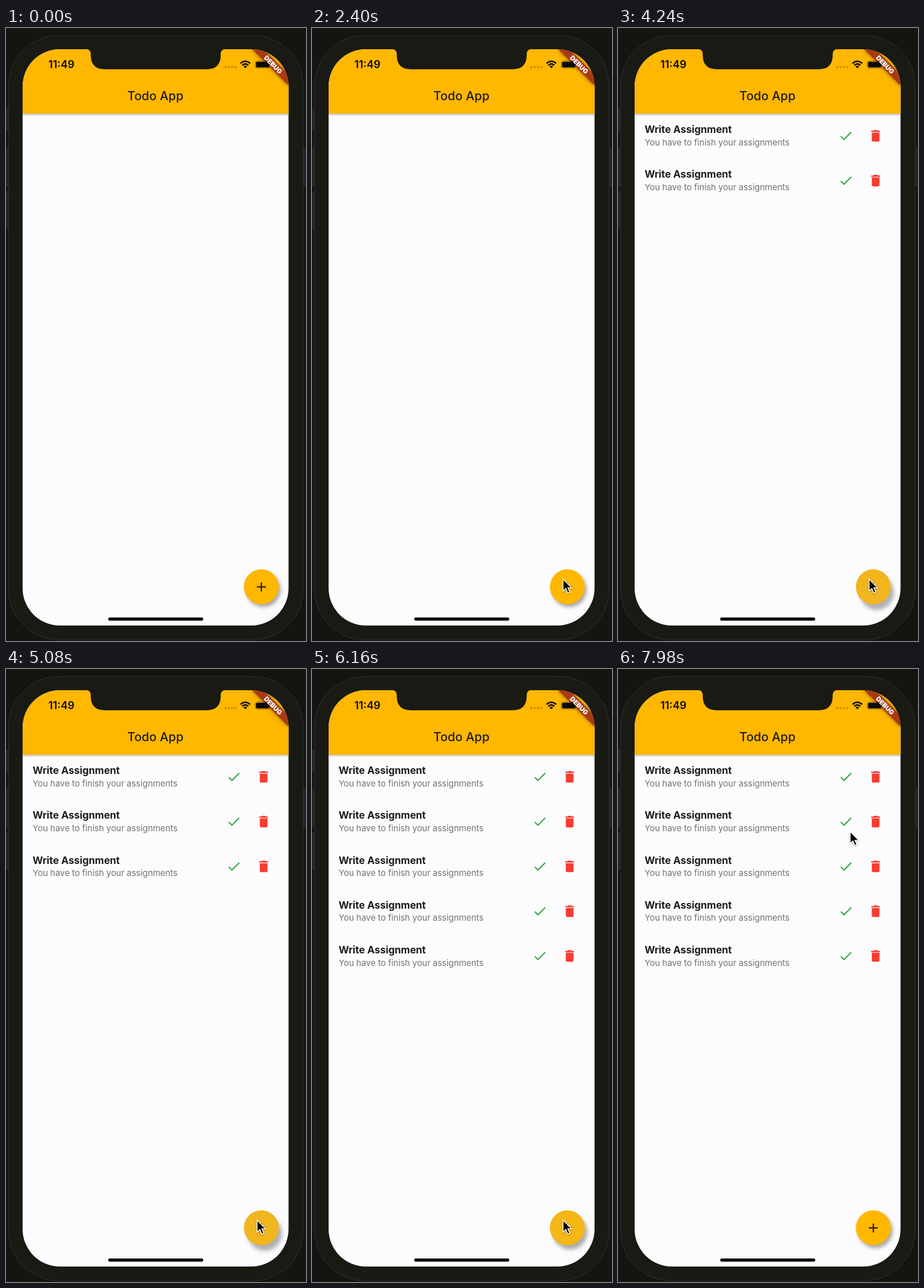
Write an HTML page that moves like this. It is 524 by 1069 pixels and loops after 8 s.

```html
<!DOCTYPE html>
<html lang="en">
<head>
<meta charset="utf-8">
<title>Todo App</title>
<style>
  html, body { margin: 0; width: 100%; height: 100%; overflow: hidden; background: #141511; }
  svg { display: block; width: 100%; height: 100%; }
  text { font-family: Inter, "Liberation Sans", sans-serif; fill: #1d1c1a; }
  .clock { font-size: 18.4px; font-weight: 600; fill: #0b0a05; }
  .bar { font-size: 21.1px; font-weight: 500; letter-spacing: .1px; }
  .head { font-size: 17.4px; font-weight: 700; }
  .sub { font-size: 15px; letter-spacing: -.06px; fill: #747375; }
  .debug { font-size: 11.4px; font-weight: 900; fill: #fff; }
</style>
</head>
<body>
<svg viewBox="0 0 524 1069">
  <defs>
    <clipPath id="screen"><rect x="29" y="37" width="464.5" height="1005" rx="65"/></clipPath>
    <clipPath id="disc"><circle cx="446" cy="974.5" r="30.5"/></clipPath>
    <filter id="soft" x="-50%" y="-50%" width="200%" height="200%"><feGaussianBlur stdDeviation="3.5"/></filter>
    <linearGradient id="barShade" x2="0" y2="1">
      <stop stop-color="#000" stop-opacity=".25"/><stop offset="1" stop-color="#000" stop-opacity="0"/>
    </linearGradient>
  </defs>

  <!-- phone body -->
  <g fill="#232421" stroke="#3a3a3a" stroke-width=".8">
    <rect x="-3" y="142" width="8" height="36"/>
    <rect x="-3" y="210" width="8" height="65"/>
    <rect x="-3" y="286" width="8" height="63"/>
    <rect x="519" y="210" width="8" height="65"/>
  </g>
  <rect x="4.5" y="13" width="514.5" height="1054" rx="88" fill="#191a14" stroke="#383838" stroke-width=".8"/>

  <g clip-path="url(#screen)">
    <rect x="29" y="37" width="465" height="1005" fill="#fcfcff"/>
    <rect x="29" y="149" width="465" height="5" fill="url(#barShade)"/>
    <rect x="29" y="37" width="465" height="112.5" fill="#ffb700"/>
    <text class="bar" x="261" y="126.3" text-anchor="middle">Todo App</text>
    <g id="list"></g>

    <!-- floating button -->
    <circle id="shade" cx="446" cy="974.5" r="30" filter="url(#soft)"/>
    <circle cx="446" cy="974.5" r="30.5" fill="#ffb700"/>
    <circle id="ripple" cx="446" cy="974.5" fill="#c8ae78" clip-path="url(#disc)"/>
    <path d="M438.2 974.7h15.6M446 966.9v15.6" stroke="#1d1c1a" stroke-width="2.2"/>

    <!-- ribbon and status bar -->
    <g transform="translate(493.5 37) rotate(45)">
      <rect x="-45" y="31.4" width="90" height="13.4" fill="#000" opacity=".5" filter="url(#soft)"/>
      <rect x="-45" y="31.4" width="90" height="13.4" fill="#aa3814"/>
    </g>
    <g fill="#0b0a05">
      <rect x="435" y="57.2" width="26.5" height="13" rx="4" fill="none" stroke="#0b0a05" stroke-opacity=".4"/>
      <rect x="436.5" y="58.7" width="23.5" height="10" rx="2.6"/>
      <path d="M463 61.5q2.2 2.2 0 4.4z" opacity=".4"/>
      <path d="M418 70.2l-3.1-3.2q3.1-2.6 6.2 0z"/>
    </g>
    <path d="M409.6 61.8q8.4-7.6 16.8 0M412.7 65q5.3-4.7 10.6 0" fill="none" stroke="#0b0a05" stroke-width="2.5"/>
    <path d="M383 68.3h20" stroke="#000" stroke-opacity=".22" stroke-width="4" stroke-linecap="round" stroke-dasharray="0 5.8"/>
    <text class="debug" text-anchor="middle" transform="translate(493.5 37) rotate(45)" y="42.2">DEBUG</text>
    <text class="clock" x="74" y="70">11:49</text>
    <rect x="178.5" y="1028" width="166" height="5.4" rx="2.7"/>
  </g>
  <path d="M139 36.5q9 .5 9 9v2q0 24.5 25 24.5h177q25 0 25-24.5v-2q0-8.5 9-9z" fill="#191a14"/>

  <path id="cursor" d="M0 0V20.8L4.8 16.4 8.2 24.4 11.8 22.8 8.4 15.2H15z" stroke="#fff" stroke-width="1.5"
        style="filter:drop-shadow(0 1px 1px rgba(0,0,0,.35))"/>
</svg>
<script>
const LOOP = 8000, ROWS = 5, PITCH = 78.1;
const FIRST_CLICK = 2760, CLICK_GAP = 825;
const $ = id => document.getElementById(id);
const clamp = v => Math.min(1, Math.max(0, v));
const ease = v => v * v * (3 - 2 * v);
const span = (t, a, b) => clamp((t - a) / (b - a));
const mix = (a, b, k) => a + (b - a) * k;
const clickAt = i => FIRST_CLICK + i * CLICK_GAP;

const row = i => `<g transform="translate(0 ${i * PITCH})">
  <text class="head" x="46.5" y="183.4">Write Assignment</text>
  <text class="sub" x="46.5" y="205.2">You have to finish your assignments</text>
  <path transform="translate(384.6 174.6) scale(1.12)" fill="#3fa947"
    d="M9 16.17 4.83 12l-1.42 1.41L9 19 21 7l-1.41-1.41z"/>
  <path transform="translate(436.6 174.6) scale(1.12)" fill="#f63c31"
    d="M6 19c0 1.1.9 2 2 2h8c1.1 0 2-.9 2-2V7H6zM19 4h-3.5l-1-1h-5l-1 1H5v2h14z"/></g>`;
$("list").innerHTML = Array.from({ length: ROWS }, (_, i) => row(i)).join("");
const rows = [...$("list").children];

function moveCursor(t) {
  const enter = ease(span(t, 400, 1250)), leave = ease(span(t, 6750, 7700));
  const x = mix(mix(528, 438.5, enter), 405.5, leave);
  const y = mix(mix(984, 961, enter), 283.5, leave);
  $("cursor").setAttribute("transform", `translate(${x} ${y})`);
}

function pressButton(t) {
  let grow = 0, level = 0;
  for (let i = 0; i < ROWS; i++) {
    const up = clickAt(i), down = up - 330;
    if (t < down || t > up + 230) continue;
    grow = ease(span(t, down, down + 150));
    level = grow * (1 - span(t, up, up + 230));
  }
  $("ripple").setAttribute("r", mix(8, 32, grow));
  $("ripple").setAttribute("opacity", .25 * Math.sqrt(level));
  $("shade").setAttribute("transform", `translate(${mix(3.5, 6, level)} ${mix(5, 10, level)})`);
  $("shade").setAttribute("opacity", mix(.36, .3, level));
}

function draw(now) {
  const t = now % LOOP;
  rows.forEach((r, i) => r.style.display = t < clickAt(i) ? "none" : "");
  moveCursor(t);
  pressButton(t);
}

const start = performance.now();
function tick() {
  draw(performance.now() - start);
  requestAnimationFrame(tick);
}
tick();
</script>
</body>
</html>
```
